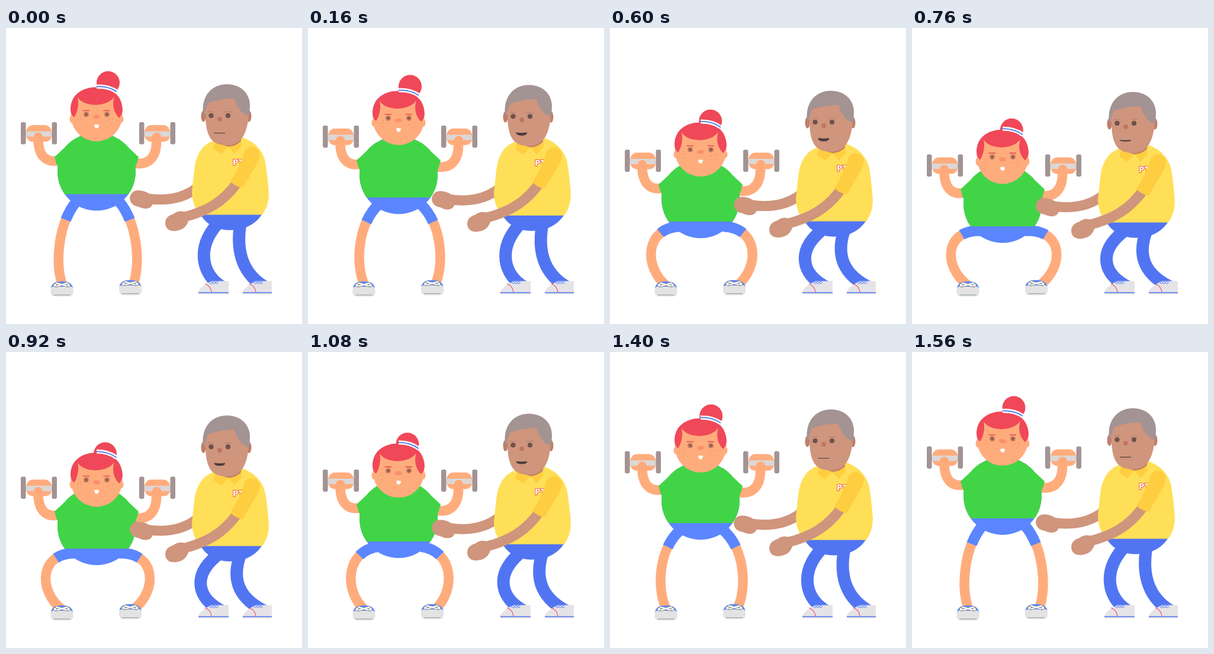
An HTML page that plays this animation: 500x500 px, repeating every 1.6 s.

```html
<!DOCTYPE html>
<html lang="en">
<head>
<meta charset="utf-8">
<title>Squat training</title>
<style>
  html, body { margin: 0; width: 100%; height: 100%; overflow: hidden; background: #fff; }
  svg { display: block; width: 100vw; height: 100vh; }
  .line { fill: none; }
  .skin { fill: #ffac7d; }
  .limb { fill: none; stroke: #ffac7d; stroke-width: 16.5; }
  .hair { fill: #f04858; }
  .green { fill: #42d447; }
  .brown { fill: #cf957d; }
  .arm { fill: none; stroke: #cf957d; stroke-width: 17; }
  .pants { fill: none; stroke: #5175f2; stroke-width: 21; }
  .grey { fill: #a39393; }
  .gold { fill: #ffce40; }
</style>
</head>
<body>
<svg viewBox="0 0 500 500">
  <defs>
    <g id="dumbbell">
      <path class="skin" d="M33 178Q36 164 45 164H67Q76 165 78 178Q77 192 66 192H44Q35 191 33 178Z"/>
      <path fill="#dcd7d5" d="M33 174.500h45v9h-45z"/>
      <rect class="grey" x="25" y="159" width="8.500" height="37.500" rx="3"/>
      <rect class="grey" x="77.500" y="159" width="8.500" height="37.500" rx="3"/>
      <circle cx="54.500" cy="184" r="7.500" fill="#fea97a"/>
    </g>
    <g id="trainer">
      <path fill="#e3e3e4" d="M75.500 441Q77 428 94 428Q112 428 113.500 441V446Q113 453.500 107 453.500H82Q76 453 75.500 446Z"/>
      <path fill="#5b86ff" d="M76 439Q78 428 94 428Q111 428 113 439Q108 434 104 437H84Q80 435 76 439Z"/>
      <g class="line" stroke-linecap="round">
        <path stroke="#777" stroke-width="4" d="M85 431L104 436M104 431L85 436"/>
        <path stroke="#fff" stroke-width="2.500" d="M85 431L104 436M104 431L85 436"/>
        <path stroke="#8b9a9a" d="M81 451H108"/>
      </g>
      <g fill="#fff" stroke="#777" stroke-width=".8">
        <circle cx="83" cy="434.500" r="2.800"/><circle cx="105.500" cy="434.500" r="2.800"/>
      </g>
    </g>
    <g id="sneaker">
      <path fill="#e5e3e6" d="M325 450V445Q329 437 346 427.500H376V450Z"/>
      <path class="line" stroke="#5175f2" stroke-width="1.300" d="M325 447H376"/>
      <path class="line" stroke="#f04858" stroke-width="1.200" d="M336 432Q346 436 347 446"/>
      <g fill="#fff" stroke="#5175f2">
        <circle cx="346" cy="430" r="1.900"/><circle cx="351" cy="430" r="1.900"/><circle cx="356" cy="430" r="1.900"/>
      </g>
    </g>
    <g id="leg">
      <path class="limb leg"/>
      <path class="line leg" stroke="#5b86ff" stroke-width="18" stroke-dasharray="36 999"/>
    </g>
    <path id="sleeve" class="green" d="M116 187Q103 196 99 202L82 218Q84 228 89 238L125 240Z"/>
  </defs>

  <use href="#leg"/>
  <use href="#leg" transform="matrix(-1 0 0 1 310 0)"/>
  <use href="#trainer"/>
  <use href="#trainer" transform="translate(115.500 -2.200)"/>
  <g id="woman">
    <path class="limb" d="M54.500 182C53 214 66 230 92 223M253.500 182C257 214 244 234 215 228"/>
    <use href="#dumbbell"/>
    <use href="#dumbbell" x="200"/>
    <circle cx="153" cy="242.500" r="66" fill="#5b86ff"/>
    <path class="green" d="M99 280.500A66 66 0 1 1 207 280.500Z"/>
    <use href="#sleeve"/>
    <use href="#sleeve" transform="matrix(-1 0 0 1 306 0)"/>
    <g id="womanHead">
      <circle id="bun" class="hair" cx="172.500" cy="92.500" r="19.500"/>
      <g class="skin">
        <ellipse cx="111.500" cy="154" rx="4" ry="6.500"/>
        <ellipse cx="194.500" cy="154" rx="4" ry="6.500"/>
        <ellipse cx="153" cy="147" rx="43.500" ry="44.500"/>
      </g>
      <path class="hair" d="M115 151Q109 146 109 138C109 113 128 100 153 100C178 100 196 113 197 138Q197 146 191 152C181 142 179 128 183 116Q174 129 151 130Q129 129 121 117C124 130 120 143 115 151Z"/>
      <g id="band" class="line">
        <path stroke="#fff" stroke-width="7" d="M153 99Q173 98 187 107.500"/>
        <path stroke="#4a70ee" stroke-width="1.800" d="M153 99Q173 98 187 107.500"/>
      </g>
      <g fill="#c47c60">
        <circle cx="135.500" cy="146" r="4.500"/><circle cx="170.500" cy="146" r="4.500"/>
      </g>
      <g fill="#8c5a4a">
        <circle cx="135.500" cy="146" r="2.200"/><circle cx="170.500" cy="146" r="2.200"/>
      </g>
      <path class="line" stroke="#e2504f" stroke-width="1.600" d="M129.500 139.500H141M164.500 139.500H176"/>
      <ellipse cx="153" cy="150" rx="6" ry="3.600" fill="#f9906c"/>
      <path fill="#fff" d="M149 163.500Q153 162 157 163.500Q157 169 153 169.500Q149.500 169 149 163.500Z"/>
      <path class="line" stroke="#cf7850" stroke-width="1.300" stroke-linecap="round" d="M126 150h0M122 154h0M127 154h0M126 160h0M174 155h0M180 154h0M170 157h0M178 162h0"/>
    </g>
  </g>

  <path id="legLeft" class="pants"/>
  <path id="legRight" class="pants"/>
  <use href="#sneaker"/>
  <svg width="449" height="500"><use href="#sneaker" x="75"/></svg>
  <g id="man">
    <path class="arm" d="M324 269C300 288 270 293 238 288"/>
    <path class="brown" d="M230 275Q212 271 209 287Q210 300 224 302Q235 308 244 303Q250 298 247 288Q246 279 230 275Z"/>
    <path fill="#5175f2" d="M325 308C334 330 354 341.500 378 341.500C404 341.500 426 330 436 308Z"/>
    <path fill="#ffdf57" d="M352 190C333 196 321 212 318 240L314 276Q314 298 327.500 315.500H433Q444 300 444 280Q441 240 437 222C430 200 414 190 398 184Z"/>
    <path fill="#c17b64" d="M357 186H397V194Q388 203 374 201Q362 199 357 186Z"/>
    <path class="gold" d="M355 190Q351 197 350 204L364 213L376 200Q363 198 355 190ZM376 200L386 213L398 200L397 191Q388 200 376 200Z"/>
    <text x="383" y="231.500" font-family="'Open Sans', sans-serif" font-size="15" font-weight="700" fill="#fff" stroke="#ee5a45" stroke-width="2" paint-order="stroke">PT</text>
    <g fill="#bf7f68">
      <ellipse cx="333.500" cy="149" rx="4" ry="9.500"/><ellipse cx="410.500" cy="149" rx="4" ry="9.500"/>
    </g>
    <path class="brown" d="M337 150V125Q345 108 373 108Q410 110 410 145C408 180 396 198 374 198C352 198 338 190 337 150Z"/>
    <path class="grey" d="M333 147C329 112 350 95 373 95C398 95 412 112 412 130Q412 141 410 149Q392 142 386 119Q362 119 341 127Q337 137 336 146Z"/>
    <g fill="#70514a">
      <circle cx="346.500" cy="148" r="4.100"/><circle cx="375" cy="148" r="4.100"/>
    </g>
    <path class="line" stroke="#b08578" stroke-width="1.400" d="M341 141.500H351M369 141.500H381"/>
    <circle cx="361" cy="154" r="3.900" fill="#c0745f"/>
    <path id="mouth" fill="#4a3a3a" stroke="#4a3a3a" stroke-width="1"/>
    <path class="arm" d="M394 256C368 296 335 311 298 320"/>
    <path class="brown" d="M300 310Q290 308 283 314Q269 318 269 330Q270 343 285 343Q298 342 304 334Q312 324 306 314Z"/>
    <path class="gold" d="M403 208C407 197 425 198 429 211Q429 221 423 231L400 270Q387 268 379 259Q394 237 403 208Z"/>
  </g>
</svg>
<script>
  const LOOP = 1600;
  const byId = id => document.getElementById(id);
  const ease = u => { u = Math.min(1, Math.max(0, u)); return u * u * (3 - 2 * u); };
  // Rises from start to peak, then falls back to zero at end.
  const swing = (t, start, peak, end) =>
    t < peak ? ease((t - start) / (peak - start)) : ease((end - t) / (end - peak));
  const move = (id, x, y) => byId(id).setAttribute('transform', `translate(${x} ${y})`);
  const curve = (el, ...points) => {
    const [a, b, c, d] = points.map(p => p.join(' '));
    el.setAttribute('d', `M${a}C${b} ${c} ${d}`);
  };

  function draw(now) {
    const t = now % LOOP;
    const squat = swing(t, 0, 800, 1600);
    const nod = swing(t, 90, 890, 1600);
    const bounce = swing(t, 190, 950, 1710);
    const talk = t < 1200 ? Math.abs(Math.sin(Math.PI * t / 400)) : 0;
    const dip = 13 * squat;

    move('woman', 0, 55 * squat);
    move('womanHead', 0, 18.5 * nod);
    move('bun', -5 * bounce, 9.5 * bounce);
    byId('band').setAttribute('transform', `rotate(${3 * bounce} 170 102)`);
    for (const leg of document.querySelectorAll('.leg')) {
      curve(leg, [119, 293 + 50 * squat], [88 - 33 * squat, 330 + 8 * squat],
        [82 - 32 * squat, 398 + 5 * squat], [96, 436]);
    }

    move('man', 0, dip);
    const bend = -8 * squat;
    curve(byId('legLeft'), [356, 332 + dip], [322 + bend, 372 + dip / 2], [330 + bend, 416], [366, 438]);
    curve(byId('legRight'), [396, 330 + dip], [388 + bend, 378 + dip / 2], [400 + bend, 418], [442, 440]);
    const lip = 177.5 - 2 * talk;
    const chin = lip + 4.5 * talk;
    byId('mouth').setAttribute('d',
      `M351.5 ${lip}Q361 ${lip + 1.5 * talk} 370 ${lip}Q369 ${chin} 361 ${chin}Q353 ${chin} 351.5 ${lip}Z`);
  }

  const start = performance.now();
  function tick() {
    draw(performance.now() - start);
    requestAnimationFrame(tick);
  }
  tick();
</script>
</body>
</html>
```
